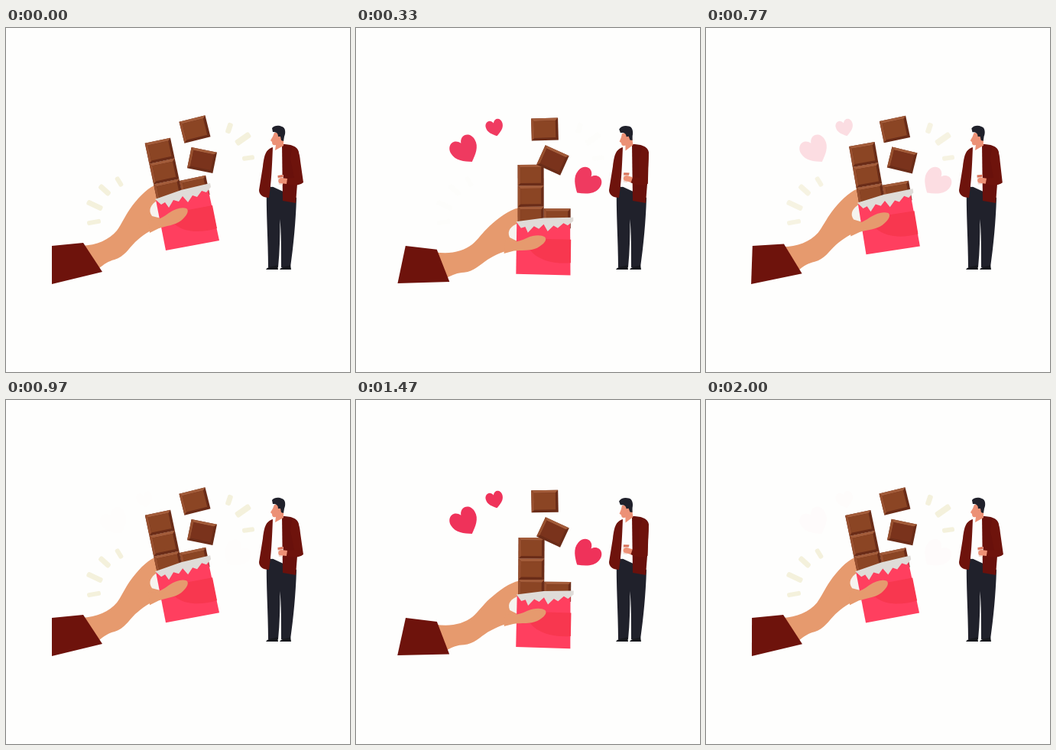
An HTML page with a canvas for the animation above (2030 ms loop, 450 px wide and 450 px high).

```html
<!DOCTYPE html>
<html lang="en">
<head>
<meta charset="utf-8">
<title>Chocolate treat</title>
<style>
html, body { margin: 0; width: 100%; height: 100%; overflow: hidden; background: #fefefd; }
canvas { display: block; width: 450px; height: 450px; }
</style>
</head>
<body>
<canvas id="stage"></canvas>
<script>
const SIZE = 450, LOOP = 2030, MOVE = 530;
const STARTS = [20, 555, 1080, 1620];
const canvas = document.getElementById('stage');
const ctx = canvas.getContext('2d');
const dpr = window.devicePixelRatio || 1;
canvas.width = canvas.height = SIZE * dpr;

const PAPER = '#fefefd', FOIL = '#dfdcd8', BROWN = '#6e130c';
const SKIN = '#e69a6e', FACE = '#ec9176', DARK = '#20212b';
const HEART = new Path2D('M0 .5C-.24 .34-.5 .16-.5-.14C-.5-.5-.12-.58 0-.28C.12-.58 .5-.5 .5-.14C.5 .16 .24 .34 0 .5Z');

// x, y, angle, length, width
const RAYS = [
  [148, 201, 58, 14, 6], [129, 212, 42, 18, 7], [116, 232, 25, 22, 7], [115, 254, -10, 18, 6],
  [292, 131, -72, 14, 7], [310, 145, -35, 22, 8], [317, 170, -8, 16, 6]
];
// x, y, angle, size
const HEARTS = [[142.5, 159.5, -31, 36], [181.5, 130.5, -15, 22.5], [301, 202, 41, 36]];

const shapes = new Map();
function fill(color, d) {
  if (!shapes.has(d)) shapes.set(d, new Path2D(d));
  ctx.fillStyle = color;
  ctx.fill(shapes.get(d));
}

function at(x, y, deg, draw) {
  ctx.save();
  ctx.translate(x, y);
  ctx.rotate(deg * Math.PI / 180);
  draw();
  ctx.restore();
}

function turn(x, y, deg, draw) {
  at(x, y, deg, () => { ctx.translate(-x, -y); draw(); });
}

function poly(color, ...p) {
  ctx.fillStyle = color;
  ctx.beginPath();
  for (let i = 0; i < p.length; i += 2) ctx.lineTo(p[i], p[i + 1]);
  ctx.fill();
}

function block(x, y, w, h, face = '#8b4524') {
  const b = 3.5, r = x + w, d = y + h;
  poly('#6a2c18', x, y, r, y, r, d, x, d);
  poly('#a35c3a', x, y, r, y, r - b, y + b, x + b, y + b);
  poly('#98502f', x, y, x + b, y + b, x + b, d - b, x, d);
  poly(face, x + b, y + b, r - b, y + b, r - b, d - b, x + b, d - b);
}

function drawRays(alpha) {
  ctx.globalAlpha = alpha;
  for (const [x, y, deg, len, w] of RAYS) {
    at(x, y, deg, () => {
      ctx.fillStyle = '#f4f1dc';
      ctx.beginPath();
      ctx.roundRect(-len / 2, -w / 2, len, w, 2.5);
      ctx.fill();
    });
  }
  ctx.globalAlpha = 1;
}

function drawHearts(alpha) {
  ctx.globalAlpha = alpha;
  for (const [x, y, deg, s] of HEARTS) {
    at(x, y, deg, () => {
      ctx.scale(s, s);
      ctx.fillStyle = '#ef3159';
      ctx.fill(HEART);
    });
  }
  ctx.globalAlpha = 1;
}

function drawHand() {
  fill(SKIN, 'M99 285C119 284 135 277 145 265C151 257 155 247 162 237C171 224 184 210 194 206L203 212L206 260L198 262C188 264 178 272 169 280C160 289 155 299 142 303C134 305 128 309 121 315Z');
  fill(BROWN, 'M60 285L101 281L126 319L60 335Z');

  at(183, 152, -12, () => {
    block(33, 56, 35, 26);
    for (let i = 0; i < 3; i++) block(-1, i * 27.5 - 1.5, 34, 27.5);
  });

  fill('#f6f3ef', 'M197 226C190 231 185 238 191 246L203 249Z');
  fill('#ff3f5f', 'M196 225L264 209L279 278L209 291Z');
  fill('#f8374f', 'M207 258L238 238L270 232L276 262C256 268 234 268 221 257Z');
  fill(FOIL, 'M195 224L229 212L267 203L268 208L262 215L256 213L250 221L244 219L238 228L231 220L226 227L219 225L213 235L208 228L203 231Z');
  fill(SKIN, 'M186 250C195 254 205 248 213 242C222 236 230 234 236 236C240 239 237 245 229 252C221 258 209 259 200 262L188 268Z');
}

function drawMan(p) {
  fill(DARK, 'M341 204L380 222C379 254 376 285 372 313L360 313C360 290 360 268 358.5 250C358.5 272 358 292 356 313L343 313C343 278 340 240 341 204Z');
  fill('#17181d', 'M340 316C343 311 349 313 355 310L356 316Z');
  fill('#17181d', 'M358 316C361 311 367 313 372 310L373 316Z');
  fill('#fdfdfd', 'M348 157L362 151L367 206L346 208Z');
  fill(BROWN, 'M349 156C340 159 338 165 336 181L331 212C331 218 336 222 344 222C347 204 348 181 349 156Z');
  fill('#69110c', 'M361 152C371 152 382 154 383 163L381 204L379 229L362 226Z');

  turn(356, 157, -9 * p, () => {
    fill(FACE, 'M351 137L361 137C364 143 363 150 363 154L352 160L353 153C349 154 348 152 348 149L346 147L349 142Z');
    fill(DARK, 'M348 131C351 127 357 127 361 129C366 130 366 138 364 142L363 148L360 147L359 142L356 142C356 138 354 136 349 136Z');
  });

  turn(375, 160, 10 * p, () => {
    fill(BROWN, 'M374 156C382 156 384 163 385 174L389 202C383 207 374 206 366 204L366 197L377 196L372 171Z');
    fill('#f3dcd4', 'M355 193L363 192L362 205L357 205Z');
    fill('#d9735c', 'M355.6 193L362.7 192L362.5 195L355.8 196Z');
    fill(FACE, 'M368 197L360 196C356 197 355 201 358 203L367 204Z');
  });
}

function pose(t) {
  const i = Math.max(0, STARTS.findLastIndex(s => t >= s));
  const u = Math.min(1, Math.max(0, (t - STARTS[i]) / MOVE));
  const e = 1 - (1 - u) ** 3.5;
  return i % 2 ? 1 - e : e;
}

function frame() {
  const p = pose(performance.now() % LOOP);
  ctx.setTransform(dpr, 0, 0, dpr, 0, 0);
  ctx.fillStyle = PAPER;
  ctx.fillRect(0, 0, SIZE, SIZE);
  drawRays(1 - p);
  turn(62, 308, 12.5 * p, drawHand);
  at(247, 132.5, -14 + 13 * p, () => block(-17.5, -14.5, 35, 29));
  at(256.5 + p, 173, 11.5 + 13.5 * p, () => block(-17, -14, 34, 28, '#7a331c'));
  drawHearts(p);
  drawMan(p);
  requestAnimationFrame(frame);
}
frame();
</script>
</body>
</html>
```
